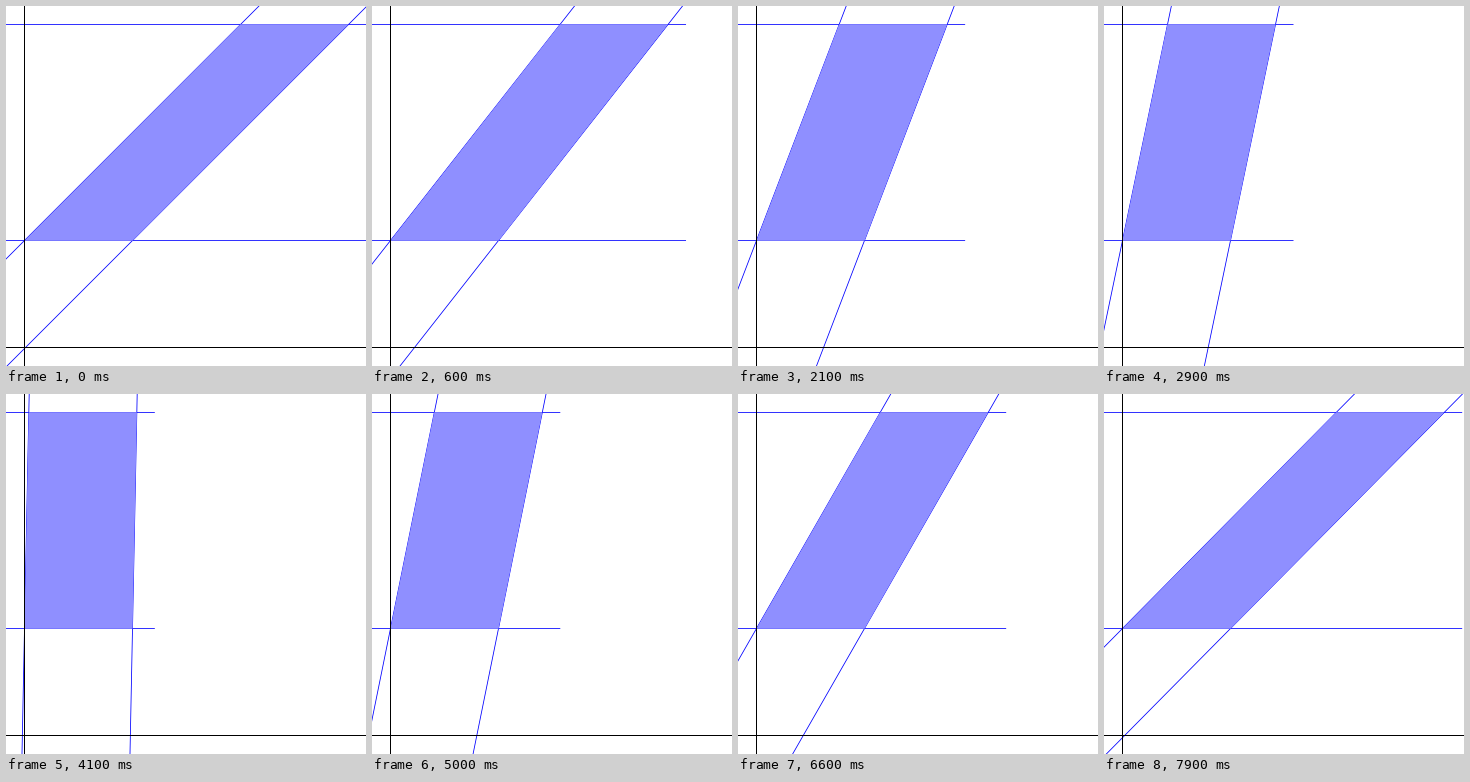
A matplotlib script for the animation above (8 s loop, 360x360 px).

```python
import math

import matplotlib.pyplot as plt
from matplotlib.animation import FuncAnimation
from matplotlib.patches import Polygon

SIZE, DPI = 360, 100
FRAMES, INTERVAL = 80, 100
STEP = 0.02                      # radians per frame
PIXEL = 72 / DPI                 # one pixel in points

LEFT, BASE = 18.5, 108           # y axis position, width of the base
TOP, BOTTOM = 18.5, 234.5        # the two parallel horizontals
AXIS_Y = 341.5
MARGIN = 18
PAD = 0.25                       # fill overlap on the horizontals

fig = plt.figure(figsize=(SIZE / DPI, SIZE / DPI), dpi=DPI, facecolor="white")
ax = fig.add_axes([0, 0, 1, 1])
ax.set_xlim(0, SIZE)
ax.set_ylim(SIZE, 0)
ax.axis("off")


def add_line(color, width, zorder):
    line, = ax.plot([], [], color=color, lw=width * PIXEL, zorder=zorder,
                    snap=False, solid_capstyle="butt")
    return line


horizontals = [add_line("#0000ff", 0.8, 1) for _ in range(2)]
slants = [add_line("#0000ff", 0.8, 1) for _ in range(2)]
fill = ax.add_patch(Polygon([(0, 0)] * 3, facecolor="#8f8fff",
                            edgecolor="none", zorder=2, snap=False))
add_line("black", 1, 3).set_data([LEFT, LEFT], [-5, SIZE + 5])
add_line("black", 1, 3).set_data([-5, SIZE + 5], [AXIS_Y, AXIS_Y])


def lean(frame):
    """Angle from the vertical: falls to zero, then rises again."""
    half = FRAMES // 2
    if frame < half:
        return math.pi / 4 - STEP * frame
    return STEP * (frame - half)


def update(frame):
    slope = math.tan(lean(frame))
    shift = slope * (BOTTOM - TOP)

    right_end = LEFT + BASE + shift + MARGIN
    for line, y in zip(horizontals, (TOP, BOTTOM)):
        line.set_data([-5, right_end], [y, y])

    for line, x in zip(slants, (LEFT, LEFT + BASE)):
        ys = [-5, SIZE + 5]
        line.set_data([x + slope * (BOTTOM - y) for y in ys], ys)

    fill.set_xy([(LEFT, BOTTOM + PAD), (LEFT + BASE, BOTTOM + PAD),
                 (LEFT + BASE + shift, TOP - PAD), (LEFT + shift, TOP - PAD)])
    return horizontals + slants + [fill]


anim = FuncAnimation(fig, update, frames=FRAMES, interval=INTERVAL,
                     repeat=True, repeat_delay=0)
plt.show()
```
